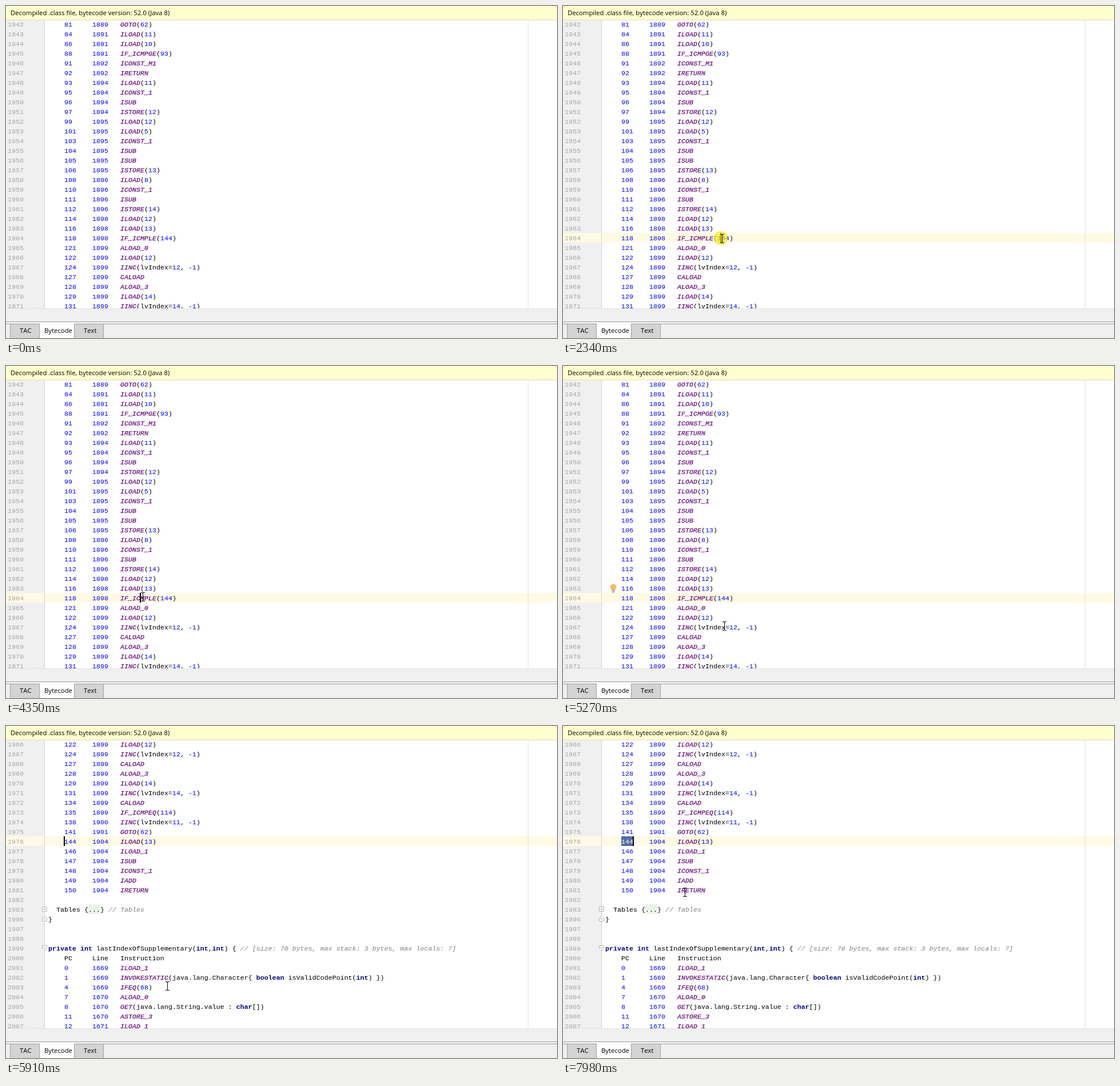
An HTML page that plays this animation: 964x581 px, repeating every 8000 ms.

```html
<!DOCTYPE html>
<html lang="en">
<head>
<meta charset="utf-8">
<title>Bytecode viewer</title>
<style>
  html, body { margin: 0; width: 100%; height: 100%; overflow: hidden; background: #f0f0f0; }
  svg { display: block; width: 964px; height: 581px; }
  text { white-space: pre; }
  .ui { font: 11.33px "Open Sans", "Noto Sans", sans-serif; font-kerning: none; fill: #000; }
  .code { font: 11.667px "Liberation Mono", "Courier New", monospace; fill: #000; }
  .lineno { fill: #a6a6a6; }
  .num { fill: #00f; }
  .op { fill: #660e7a; stroke: #660e7a; stroke-width: .25px; font-style: italic; }
  .key { fill: #000080; font-weight: bold; }
  .note { fill: #808080; font-style: italic; }
  .picked { fill: #fff; }
  .edge { fill: none; stroke: #a0a0a0; }
  .fold { fill: #fff; stroke: #b9b0b4; }
</style>
</head>
<body>
<svg id="stage" viewBox="0 0 964 581">
  <defs><clipPath id="view"><rect y="25" width="964" height="504"/></clipPath></defs>
  <rect width="964" height="581" fill="#f0f0f0"/>
  <rect x="68" y="25" width="896" height="504" fill="#fff"/>
  <g clip-path="url(#view)">
    <g id="sheet">
      <rect id="band" width="964" height="17" fill="#fffae3"/>
    </g>
    <path d="M67.5 25V529" stroke="#d2d2d2"/>
    <path d="M913.5 25V529" stroke="#e2e2e2"/>
    <g id="top">
      <g id="folds"></g>
      <rect id="pick" height="17" fill="#526da5"/>
      <text id="picked" class="code picked">144</text>
      <rect id="caret" width="2" height="17"/>
    </g>
    <g id="bulb">
      <circle cx="88" cy="387" r="4.8" fill="#f2bd62" stroke="#d9a24a" stroke-width=".8"/>
      <path d="M85.5 392.5h5M85.5 394.5h5M86.5 396.5h3" stroke="#777"/>
    </g>
  </g>
  <rect width="964" height="24" fill="#ffffcc"/>
  <path d="M0 24.5H964" stroke="#d9d9d9"/>
  <text class="ui" x="8" y="16">Decompiled .class file, bytecode version: 52.0 (Java 8)</text>
  <path d="M0 529.5H964" stroke="#e4e4e4"/>
  <path class="edge" d="M0 552.5H964M0 556.5H964"/>
  <path class="edge" d="M7.5 581V556.5H58.5V581M119.5 581V556.5H170.5V581" style="fill:#d4d4d4"/>
  <rect x="59" y="554" width="60" height="27" fill="#fff"/>
  <text class="ui" x="24" y="572">TAC</text>
  <text class="ui" x="67" y="572">Bytecode</text>
  <text class="ui" x="136" y="572">Text</text>
  <circle id="click" r="12" fill="#f4ea10" opacity=".7"/>
  <g id="pointer">
    <path id="beam" fill="none" stroke="#111" stroke-width="1.1"
      d="M-3.5-7.5h2.5l1 1 1-1h2.5M0-6.5v13M-3.5 7.5h2.5l1-1 1 1h2.5"/>
    <path id="arrow" fill="#fff" stroke="#000" d="M.5.5v16l3.7-3.6 2.5 5.6 2.3-1-2.5-5.5h5z"/>
  </g>
</svg>
<script>
const LOOP = 8000, ROW = 17, TOP = 23, LEFT = 74;

const listing = `81 1889 GOTO(62)
84 1891 ILOAD(11)
86 1891 ILOAD(10)
88 1891 IF_ICMPGE(93)
91 1892 ICONST_M1
92 1892 IRETURN
93 1894 ILOAD(11)
95 1894 ICONST_1
96 1894 ISUB
97 1894 ISTORE(12)
99 1895 ILOAD(12)
101 1895 ILOAD(5)
103 1895 ICONST_1
104 1895 ISUB
105 1895 ISUB
106 1895 ISTORE(13)
108 1896 ILOAD(8)
110 1896 ICONST_1
111 1896 ISUB
112 1896 ISTORE(14)
114 1898 ILOAD(12)
116 1898 ILOAD(13)
118 1898 IF_ICMPLE(144)
121 1899 ALOAD_0
122 1899 ILOAD(12)
124 1899 IINC(lvIndex=12, -1)
127 1899 CALOAD
128 1899 ALOAD_3
129 1899 ILOAD(14)
131 1899 IINC(lvIndex=14, -1)
134 1899 CALOAD
135 1899 IF_ICMPEQ(114)
138 1900 IINC(lvIndex=11, -1)
141 1901 GOTO(62)
144 1904 ILOAD(13)
146 1904 ILOAD_1
147 1904 ISUB
148 1904 ICONST_1
149 1904 IADD
150 1904 IRETURN

  Tables {...} // Tables
}


private int lastIndexOfSupplementary(int,int) { // [size: 70 bytes, max stack: 3 bytes, max locals: 7]
    PC     Line   Instruction
0 1669 ILOAD_1
1 1669 INVOKESTATIC(java.lang.Character{ boolean isValidCodePoint(int) })
4 1669 IFEQ(68)
7 1670 ALOAD_0
8 1670 GET(java.lang.String.value : char[])
11 1670 ASTORE_3
12 1671 ILOAD_1`.split("\n");

const TOKEN = /(\/\/.*|\b(?:boolean|int|char|private)\b|-?\b\d+\b|\b[A-Z][A-Z_\d]{2,}\b)/;
const $ = id => document.getElementById(id);
const rowTop = row => TOP + row * ROW;

function add(parent, tag, attrs, text) {
  const el = document.createElementNS("http://www.w3.org/2000/svg", tag);
  set(el, attrs);
  if (text !== undefined) el.textContent = text;
  return parent.appendChild(el);
}

function set(el, attrs) {
  for (const key in attrs) el.setAttribute(key, attrs[key]);
}

function show(el, on) {
  el.style.display = on ? "" : "none";
}

function tokenClass(s) {
  if (s.startsWith("//")) return "note";
  if (/^-?\d/.test(s)) return "num";
  return /^[A-Z]/.test(s) ? "op" : "key";
}

function layOut(line) {
  const m = line.match(/^(\d+) (\d+) (.*)/);
  return m ? "    " + m[1].padEnd(7) + m[2].padEnd(7) + m[3] : line;
}

function addFold(row, kind) {
  const y = rowTop(row) + 8.5;
  const shapes = {
    closed: "M63.5 -4h8v8h-8z",
    open: "M63.5 -4h8v5l-4 3.5-4-3.5z",
    end: "M63.5 4h8v-5l-4-3.5-4 3.5z"
  };
  const sign = kind === "closed" ? "M65.5 0h4M67.5 -2v4" : "M65.5 0h4";
  add($("folds"), "path", { class: "fold", d: shapes[kind] + sign, transform: `translate(0 ${y})` });
}

add($("sheet"), "rect", { x: 144, y: rowTop(41), width: 21, height: ROW, fill: "#e9f5e6" });
listing.forEach((line, row) => {
  const y = rowTop(row) + 13;
  const number = 1942 + row + (row > 41 ? 12 : 0);
  add($("sheet"), "text", { class: "code lineno", x: 3, y }, number);
  const text = add($("sheet"), "text", { class: "code", x: LEFT, y });
  layOut(line).split(TOKEN).forEach((part, i) => {
    if (part) add(text, "tspan", i % 2 ? { class: tokenClass(part) } : {}, part);
  });
});
addFold(41, "closed");
addFold(42, "end");
addFold(45, "open");

// Pointer moves: start, end, number of steps, x, y
const moves = [
  [700, 700, 1, 762, 559],
  [780, 1500, 10, 293, 420.5],
  [1550, 1640, 2, 292, 419.5],
  [1810, 2120, 5, 278, 407],
  [3120, 3270, 3, 336, 460.5],
  [3810, 3810, 1, 321, 456],
  [3890, 4270, 6, 239, 403.5],
  [4660, 4970, 5, 281, 454.5],
  [5120, 5120, 1, 282, 455],
  [6520, 7060, 8, 112, 197],
  [7280, 7280, 1, 111, 196],
  [7750, 7980, 4, 213, 291]
];
// Clicks: from, to, x, y
const clicks = [
  [2340, 2660, 276, 406], [2830, 2890, 276, 406], [4270, 4350, 237, 403],
  [7450, 7520, 109, 195], [7600, 7750, 109, 195]
];
// Carets: from, to, x, row
const carets = [
  [2340, 2830, 276, 22], [2830, 3270, 291, 22], [4270, 5270, 235, 22], [5830, 6520, 102, 34],
  [7280, 7450, 102, 34], [7450, 7600, 109, 34], [7600, LOOP, 123, 34]
];
// Selections: from, to, x, row
const picks = [[2830, 4270, 270, 22], [7600, LOOP, 102, 34]];

const active = (list, t) => list.find(([from, to]) => t >= from && t < to);
const ease = p => p * p * (3 - 2 * p);

function pointerAt(t) {
  let x = 762, y = 559;
  for (const [from, to, steps, endX, endY] of moves) {
    if (t < from) break;
    const done = t >= to ? steps : Math.floor((t - from) / (to - from) * (steps - 1) + 1e-6) + 1;
    const p = ease(done / steps);
    x += (endX - x) * p;
    y += (endY - y) * p;
  }
  return [x, y];
}

function draw(t) {
  const scroll = t < 5830 ? 0 : t < 5910 ? 75 : 408;
  for (const id of ["sheet", "top"]) set($(id), { transform: `translate(0 ${-scroll})` });

  show($("band"), t >= 2340);
  set($("band"), { y: rowTop(t < 5830 ? 22 : 34) });
  show($("bulb"), (t >= 3430 && t < 4270) || (t >= 5120 && t < 5830));

  const pick = active(picks, t);
  show($("pick"), pick);
  show($("picked"), pick);
  if (pick) {
    const [, , x, row] = pick;
    set($("pick"), { x, y: rowTop(row), width: 21 });
    set($("picked"), { x, y: rowTop(row) + 13 });
  }

  const caret = active(carets, t);
  show($("caret"), caret);
  if (caret) set($("caret"), { x: caret[2] - 1, y: rowTop(caret[3]) });

  const click = active(clicks, t);
  show($("click"), click);
  if (click) set($("click"), { cx: click[2], cy: click[3] });

  const [x, y] = pointerAt(t);
  show($("pointer"), t >= 700);
  show($("beam"), y <= 529);
  show($("arrow"), y > 529);
  set($("pointer"), { transform: `translate(${Math.round(x) + 0.5} ${Math.round(y)})` });
}

const start = performance.now();
function tick() {
  draw((performance.now() - start) % LOOP);
  requestAnimationFrame(tick);
}
tick();
</script>
</body>
</html>
```
